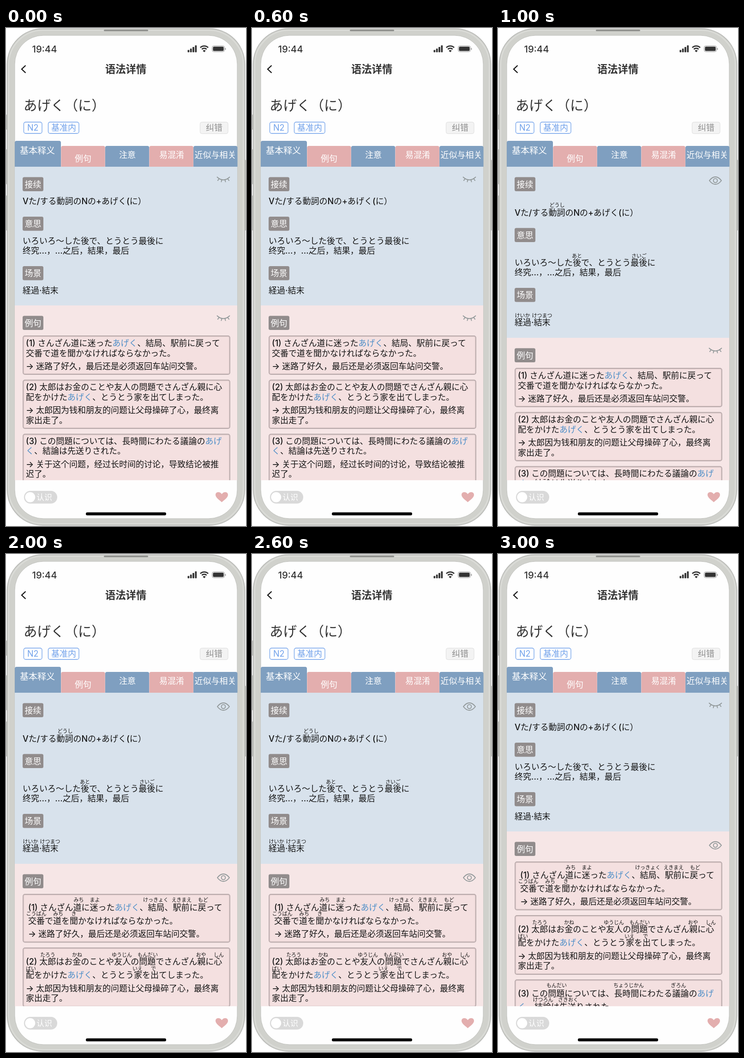
An HTML page that plays this animation: 520 px wide and 1077 px high, repeating every 4 s.

```html
<!DOCTYPE html>
<html lang="ja">
<head>
<meta charset="utf-8">
<style>
html, body { margin: 0; width: 100%; height: 100%; overflow: hidden; background: #fff; }
svg { display: block; width: 520px; height: 1077px; }
text { font: 500 18px Inter, "Noto Sans CJK JP", sans-serif; fill: #151515; white-space: pre; }
.zh { font-family: Inter, "Noto Sans CJK SC", sans-serif; }
.ruby { font-size: 11px; text-anchor: middle; }
.key { fill: #4f8fc8; }
.ui { font-weight: 400; }
</style>
</head>
<body>
<svg viewBox="0 0 520 1077">
  <defs>
    <clipPath id="page"><rect x="19" y="300" width="482" height="678"/></clipPath>
    <g id="open" fill="none" stroke="#919899" stroke-width="1.8">
      <path d="M-13 0Q-7-8 0-8T13 0Q7 8 0 8T-13 0Z"/><circle r="4.3"/>
    </g>
    <path id="closed" d="M-14-8Q0 5 14-8M-9-4.2l-3.6 4.6M-3.4-2l-1.3 5.4M3.4-2l1.3 5.4M9-4.2l3.6 4.6"
      fill="none" stroke="#919899" stroke-width="1.8"/>
  </defs>
  <g id="phone"></g>
  <g clip-path="url(#page)">
    <g id="meaning"></g>
    <g id="examples"></g>
  </g>
  <g id="bars"></g>
</svg>
<script>
const $ = id => document.getElementById(id);
const BLUE = '#7f9fc0', PINK = '#e3aeae';

const rect = (x, y, w, h, fill, r = 0, more = '') =>
  `<rect x="${x}" y="${y}" width="${w}" height="${h}" rx="${r}" fill="${fill}" ${more}/>`;
const text = (x, y, str, cls = '', more = '') =>
  `<text x="${x}" y="${y}" class="${cls}" ${more}>${str.replace(/\[(.+?)\]/g, '<tspan class="key">$1</tspan>')}</text>`;
const label = (x, y, str, size, color, weight = 400) =>
  text(x, y, str, 'zh', `style="font-size:${size}px;fill:${color};font-weight:${weight}"`);
const ruby = (y, words) => Object.entries(words).map(([w, x]) => text(x, y, w, 'ruby')).join('');
const chip = (y, str) => rect(36, y, 45, 30.5, '#918c8c', 3.5) + label(40.5, y + 22, str, 18, '#fff');
const eye = (kind, y) => `<use href="#${kind}" x="471" y="${y}"/>`;
const card = (y, h) =>
  rect(37, y + 1, 448, h - 2, '#f4e0e0', 4, 'stroke="#b8a9aa" stroke-width="1.8"') +
  rect(38.5, y + 2.5, 445, h - 5, 'none', 3, 'stroke="#b8a9aa" stroke-opacity=".3" stroke-width="1.6"');

function phone() {
  const side = (x, y, h) => rect(x, y, 4, h, '#c3c4c1', 1.5);
  const tab = (x, y, w, fill) =>
    `<path d="M${x} 300V${y + 4}q0-4 4-4h${w - 8}q4 0 4 4V300z" fill="${fill}"/>`;
  return side(0, 187, 33) + side(0, 262, 76) + side(0, 362, 76) + side(516, 285, 153) +
    rect(2.5, 1.5, 515, 1074, '#d0d1cc', 77, 'stroke="#b4b5b2" stroke-width="1.5"') +
    rect(6, 5, 508, 1067, 'none', 74, 'stroke="#dcddd9" stroke-width="2"') +
    rect(212, 3.5, 96, 3.5, '#8f908d', 1.7) +
    rect(19, 16, 482, 1045, '#fefefe', 62, 'stroke="#bfc0bc"') +
    label(56.5, 53, '19:44', 20.3, '#333', 500) +
    [5, 8, 11.5, 15].map((h, i) => rect(393.5 + i * 5.3, 52.5 - h, 3.8, h, '#333', 1)).join('') +
    `<path d="M421 42.5a12 12 0 0 1 17 0M424.3 46a7.5 7.5 0 0 1 10.4 0" fill="none" stroke="#333" stroke-width="2.7"/>
     <path d="M429.5 52.5l-3.2-3.4a4.6 4.6 0 0 1 6.4 0z" fill="#333"/>` +
    rect(446.5, 38.5, 27, 13, 'none', 4, 'stroke="#999" stroke-width="1"') +
    rect(448.3, 40.3, 23.4, 9.4, '#333', 2.5) + rect(474.7, 43, 1.6, 4.5, '#999', 1) +
    `<path d="M42.5 81L34 89l8.5 8" fill="none" stroke="#111" stroke-width="2.3"/>` +
    label(215, 97, '语法详情', 22.3, '#333', 700) +
    text(38, 177.5, 'あげく（に）', 'ui', 'style="font-size:29.5px;fill:#333"') +
    rect(38.5, 203.5, 39.5, 24.5, '#fff', 4, 'stroke="#6fa0ea" stroke-width="1.3"') +
    label(46, 222, 'N2', 18, '#6fa0ea') +
    rect(91.5, 203.5, 66.5, 24.5, '#fff', 4, 'stroke="#6fa0ea" stroke-width="1.3"') +
    label(98, 222, '基准内', 18, '#6fa0ea') +
    rect(420.5, 203.5, 60.5, 25, '#f3f3f3', 4, 'stroke="#ddd"') +
    label(433, 222, '纠错', 18, '#8e8e8e') +
    tab(19, 244, 100, BLUE) +
    [PINK, BLUE, PINK, BLUE].map((c, i) => tab(119.3 + i * 95.6, 255, 95.4, c)).join('') +
    label(30, 272, '基本释义', 19, '#fff') + label(149, 288.5, '例句', 18, '#fff') +
    label(245, 281, '注意', 18, '#fff') + label(332, 281, '易混淆', 18, '#fff') +
    label(408.5, 281, '近似与相关', 18, '#fff');
}

// Grammar notes; readings push the lines down.
function meaning(open) {
  const [form, chip2, sense, chip3, scene, end] = open
    ? [405.5, 432.5, 513.5, 562, 643, 670]
    : [381, 408, 467, 515, 573.5, 600];
  return rect(19, 300, 482, end - 300, '#d8e2ec') +
    eye(open ? 'open' : 'closed', 330) +
    chip(322.5, '接续') + text(36, form, 'Vた/する動詞のNの+あげく(に）') +
    chip(chip2, '意思') + text(36, sense, 'いろいろ〜した後で、とうとう最後に') +
    text(36, sense + 21, '终究...，...之后，結果，最后', 'zh') +
    chip(chip3, '场景') + text(36, scene, '経過·結末') +
    (open ? ruby(386.5, { どうし: 128 }) + ruby(496.5, { あと: 171, さいご: 305.5 }) +
      ruby(626, { けいか: 53, けつまつ: 95.5 }) : '');
}

function examples(open) {
  const [x1, tops, heights, lines] = open
    ? [48, [665, 781, 920], [105.5, 129, 140],
      [701, 729.5, 757.5, 818, 847, 875.5, 897, 956.5, 985.5, 1014, 1035.5]]
    : [43, [665, 760.5, 877.5], [85, 106.5, 106.5],
      [688, 709.5, 737.5, 783, 804.5, 833, 854.5, 899.5, 921, 949.5, 971]];
  const copy = [
    '(1) さんざん道に迷った[あげく]、結局、駅前に戻って',
    '交番で道を聞かなければならなかった。',
    '→ 迷路了好久，最后还是必须返回车站问交警。',
    '(2) 太郎はお金のことや友人の問題でさんざん親に心',
    '配をかけた[あげく]、とうとう家を出てしまった。',
    '→ 太郎因为钱和朋友的问题让父母操碎了心，最终离',
    '家出走了。',
    '(3) この問題については、長時間にわたる議論の[あげ]',
    '[く]、結論は先送りされた。',
    '→ 关于这个问题，经过长时间的讨论，导致结论被推',
    '迟了。'
  ];
  const chinese = [2, 5, 6, 9, 10];
  return rect(19, 600, 482, 500, '#f6e6e6') +
    eye(open ? 'open' : 'closed', 630) + chip(622.5, '例句') +
    tops.map((y, i) => card(y, heights[i])).join('') +
    copy.map((s, i) => text(i < 3 ? x1 : 43, lines[i], s, chinese.includes(i) ? 'zh' : '')).join('') +
    (open ? ruby(682, { みち: 157.5, まよ: 192.5, けっきょく: 324.5, えきまえ: 380.5, もど: 427 }) +
      ruby(712, { こうばん: 65.5, みち: 113, き: 147 }) +
      ruby(800.5, { たろう: 90.5, かね: 154, ゆうじん: 251, もんだい: 307, おや: 422.5, しん: 461 }) +
      ruby(831, { ばい: 54, いえ: 285, で: 319.5 }) +
      ruby(937, { もんだい: 127, ちょうじかん: 283, ぎろん: 391 }) +
      ruby(968, { けつろん: 97.5, さきおく: 152 }) : '');
}

$('phone').innerHTML = phone();
$('bars').innerHTML = rect(39, 1001, 72, 27.5, '#d9d9d9', 13.7) +
  '<circle cx="52.3" cy="1014.7" r="11" fill="#fff"/>' + label(66, 1021, '认识', 17, '#fff') +
  `<path d="M467.5 1025.5C460 1019 454 1015 454 1009.5C454 1002.5 463.5 1001.5 467.5 1008C471.5 1001.5 481 1002.5 481 1009.5C481 1015 475 1019 467.5 1025.5z" fill="${PINK}"/>` +
  rect(173, 1047.5, 174, 6.5, '#000', 3.2);

let shown = -1;
function draw() {
  const step = Math.floor(performance.now() / 1000) % 4;
  if (step !== shown) {
    shown = step;
    const notesOpen = step === 1 || step === 2;
    $('meaning').innerHTML = meaning(notesOpen);
    $('examples').innerHTML = examples(step >= 2);
    $('examples').setAttribute('transform', `translate(0 ${notesOpen ? 70 : 0})`);
  }
  requestAnimationFrame(draw);
}
draw();
</script>
</body>
</html>
```
